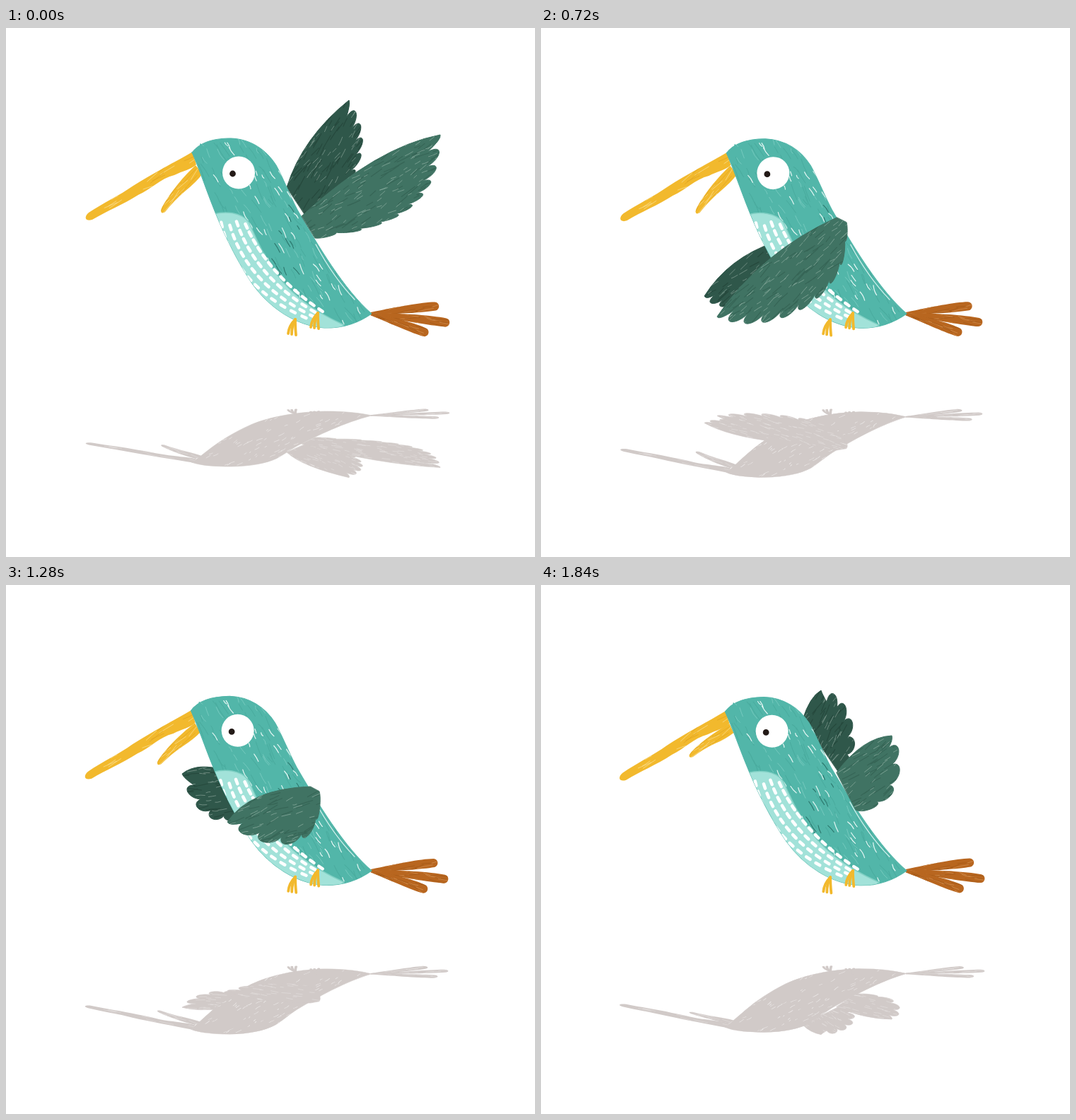
Write an HTML page with a canvas that moves like this. It is 748 px wide and 748 px high and loops after 1.92 s.

```html
<!DOCTYPE html>
<html lang="en">
<head>
<meta charset="utf-8">
<title>Flying bird</title>
<style>
  html, body { margin: 0; width: 100%; height: 100%; overflow: hidden; background: #fff; }
  canvas { display: block; width: 100vw; height: 100vh; }
</style>
</head>
<body>
<canvas id="stage" width="748" height="748"></canvas>
<script>
const ctx = document.getElementById('stage').getContext('2d');
const STEP = 80, STEPS = 24, FLAP = 6;
const HEAD_TOP = 155, FEET_Y = 438, SHADOW_Y = 538, SHADOW_H = 98;
const JOINT = [516, 404], JAW_JOINT = [272, 196];
const SHADE = '#d1cac8', YELLOW = '#f2b92d', TEAL = '#52b6a9';

const BODY = new Path2D('M263 176C275 160 297 156 318 156C346 157 368 172 382 194C392 212 400 234 412 257C440 306 478 370 517 404C500 416 478 425 450 424C410 421 372 396 347 360C322 322 303 280 290 246C280 220 272 196 263 176Z');
const BELLY = new Path2D('M294 263C310 259 332 260 343 274C352 292 356 306 372 332C396 372 430 398 478 420L450 440L340 400L280 260Z');
const BEAK = new Path2D('M264 175C240 189 205 207 180 223C160 237 138 247 117 261C109 268 113 274 122 271C142 259 165 250 187 236C205 228 218 213 238 208C250 202 262 200 269 193Z');
const JAW = new Path2D('M268 194C252 209 234 230 222 251C217 259 219 264 225 260C233 250 242 240 254 230C264 222 272 214 278 206Z');

// Wing key points: root, leading edge, tip, two pulls on the feathered edge, rear root.
const UP = {
  near: [[418, 266], [524, 168], [614, 151], [615, 235], [573, 283], [437, 297]],
  far: [[397, 225], [419, 155], [485, 102], [512, 140], [525, 205], [430, 275]]
};
const DOWN = {
  near: [[418, 268], [312, 316], [249, 408], [300, 440], [445, 400], [432, 275]],
  far: [[330, 303], [265, 325], [231, 379], [240, 400], [290, 410], [345, 340]]
};
const FOLD = {
  near: [[430, 285], [345, 288], [313, 335], [335, 365], [455, 405], [443, 292]],
  far: [[310, 262], [270, 250], [249, 267], [255, 305], [285, 350], [335, 330]]
};
const RISE = {
  near: [[418, 265], [455, 215], [496, 213], [515, 225], [520, 325], [445, 318]],
  far: [[370, 190], [380, 158], [396, 149], [430, 145], [465, 215], [428, 275]]
};
const POSES = [UP, blend(UP, DOWN, 0.25), blend(UP, DOWN, 0.8), DOWN, FOLD, RISE];

function mix(p, q, t) {
  return p.map((v, i) => v + (q[i] - v) * t);
}

function blend(a, b, t) {
  const side = k => a[k].map((p, i) => mix(p, b[k][i], t));
  return { near: side('near'), far: side('far') };
}

// Point on a Bezier curve of any degree.
function curve(pts, t) {
  while (pts.length > 1) pts = pts.slice(1).map((p, i) => mix(pts[i], p, t));
  return pts[0];
}

function clamp(t) {
  return Math.max(0, Math.min(1, t));
}

function random(seed) {
  return () => {
    seed = (seed * 1664525 + 1013904223) >>> 0;
    return seed / 4294967296;
  };
}

// Feathers fan out from the hub; each lobe bulges between two notches.
function wingPath([root, lead, tip, pullA, pullB, rear]) {
  const span = Math.hypot(tip[0] - rear[0], tip[1] - rear[1]);
  const lobes = Math.max(3, Math.round(span / 26)), depth = 10 + span * 0.05;
  const hub = mix(root, rear, 0.5), edge = [tip, pullA, pullB, rear];
  const notch = i => {
    const t = (i + 0.5) / (lobes + 0.5), p = curve(edge, t);
    const reach = Math.hypot(p[0] - hub[0], p[1] - hub[1]) || 1;
    return i === lobes ? rear : mix(p, hub, Math.min(0.5, depth * (1 - t * 0.5) / reach));
  };
  const path = new Path2D();
  path.moveTo(...root);
  path.quadraticCurveTo(...lead, ...tip);
  path.quadraticCurveTo(tip[0] + 2, tip[1] + 6, ...notch(0));
  for (let i = 1; i <= lobes; i++) {
    const a = notch(i - 1), b = notch(i);
    const peak = curve(edge, i / (lobes + 0.5)), mid = mix(a, b, 0.5);
    const push = p => p.map((v, k) => v + (peak[k] - mid[k]) * 1.3);
    path.bezierCurveTo(...push(a), ...push(b), ...b);
  }
  path.closePath();
  return path;
}

// Short hand-drawn strokes inside a shape. box = [x, y, w, h]
function scratch(path, box, count, angle, length, color, width, seed) {
  const rnd = random(seed);
  ctx.save();
  ctx.clip(path);
  ctx.strokeStyle = color;
  ctx.lineWidth = width;
  ctx.beginPath();
  for (let i = 0; i < count; i++) {
    const x = box[0] + rnd() * box[2], y = box[1] + rnd() * box[3];
    const a = angle + (rnd() - 0.5) * 0.45, l = length * (0.5 + rnd());
    const bend = (rnd() - 0.5) * 3;
    const dx = Math.cos(a) * l, dy = Math.sin(a) * l;
    ctx.moveTo(x, y);
    ctx.quadraticCurveTo(x + dx / 2 - bend, y + dy / 2 + bend, x + dx, y + dy);
  }
  ctx.stroke();
  ctx.restore();
}

function shape(path, color, edge = 0) {
  ctx.fillStyle = ctx.strokeStyle = color;
  ctx.fill(path);
  if (edge) {
    ctx.lineWidth = edge;
    ctx.stroke(path);
  }
}

function line(d, color, width) {
  ctx.strokeStyle = color;
  ctx.lineWidth = width;
  ctx.stroke(new Path2D(d));
}

function disc(x, y, r, color) {
  ctx.fillStyle = color;
  ctx.beginPath();
  ctx.arc(x, y, r, 0, 7);
  ctx.fill();
}

function around([px, py], angle, scale, draw) {
  ctx.save();
  ctx.translate(px, py);
  ctx.rotate(angle);
  ctx.scale(scale, scale);
  ctx.translate(-px, -py);
  draw();
  ctx.restore();
}

function wing(pts, color, light, dark, shadow, seed) {
  const path = wingPath(pts), [root, , tip] = pts;
  const xs = pts.map(p => p[0]), ys = pts.map(p => p[1]);
  const x = Math.min(...xs), y = Math.min(...ys);
  const box = [x, y, Math.max(...xs) - x, Math.max(...ys) - y];
  const angle = Math.atan2(tip[1] - root[1], tip[0] - root[0]);
  const count = box[2] * box[3] / 200;
  shape(path, shadow ? SHADE : color, 1);
  if (!shadow) scratch(path, box, count, angle, 16, dark, 1.2, seed + 5);
  scratch(path, box, count, angle, 9, shadow ? 'rgba(255,255,255,.45)' : light, 0.8, seed);
}

function tail(stretch, shadow) {
  for (const [x, y] of [[612, 393], [627, 417], [597, 432]]) {
    const dx = (x - JOINT[0]) * stretch, dy = y - JOINT[1], len = Math.hypot(dx, dy);
    const path = new Path2D();
    path.moveTo(0, -2);
    path.bezierCurveTo(len * 0.4, -5, len * 0.75, -8, len - 5, -6);
    path.bezierCurveTo(len + 2, -5, len + 2, 5, len - 5, 6);
    path.bezierCurveTo(len * 0.75, 7, len * 0.4, 4, 0, 2);
    ctx.save();
    ctx.translate(...JOINT);
    ctx.rotate(Math.atan2(dy, dx));
    shape(path, shadow ? SHADE : '#b8661f');
    const box = [0, -6, len, 12];
    scratch(path, box, 9, 0, 18, shadow ? 'rgba(255,255,255,.4)' : '#cf8a4a', 0.8, y);
    if (!shadow) scratch(path, box, 8, 0, 22, '#a55a18', 0.8, x);
    ctx.restore();
  }
}

function beakPart(path, box, angle, shadow, seed) {
  shape(path, shadow ? SHADE : YELLOW);
  scratch(path, box, 34, angle, 16, shadow ? 'rgba(255,255,255,.4)' : '#f9dc8d', 0.8, seed);
  if (!shadow) scratch(path, box, 30, angle, 18, '#e0a522', 0.8, seed + 3);
}

function feet(color) {
  for (const [x, y] of [[409, 412], [441, 403]]) {
    for (const toe of [-10, -5, 1]) {
      line(`M${x} ${y}q${toe * 0.8 - 1} 9 ${toe} ${22 + toe * 0.2}`, color, 3.8);
    }
  }
}

function belly() {
  const left = [[305, 278], [328, 378], [450, 420]];
  const right = [[338, 276], [372, 355], [462, 410]];
  const rows = 13, cols = 4;
  ctx.save();
  ctx.clip(BODY);
  shape(BELLY, '#a2e2d9');
  ctx.strokeStyle = '#80d0c4';
  ctx.lineWidth = 1.5;
  ctx.stroke(BELLY);
  ctx.strokeStyle = '#fff';
  ctx.lineWidth = 4.5;
  ctx.beginPath();
  for (let row = 0; row < rows; row++) {
    for (let col = 0; col < cols; col++) {
      const t = (row + (col % 2) * 0.35) / rows * 0.95;
      const spot = s => mix(curve(left, s), curve(right, s), col / (cols - 1));
      const [x, y] = spot(t), [x2, y2] = spot(t + 0.02);
      const a = Math.atan2(y2 - y, x2 - x), dx = 3.3 * Math.cos(a), dy = 3.3 * Math.sin(a);
      ctx.moveTo(x - dx, y - dy);
      ctx.lineTo(x + dx, y + dy);
    }
  }
  ctx.stroke();
  ctx.restore();
}

function body(shadow) {
  const box = [262, 155, 255, 265];
  shape(BODY, shadow ? SHADE : TEAL, 1);
  if (shadow) {
    scratch(BODY, box, 150, 1.05, 10, 'rgba(255,255,255,.6)', 1, 7);
    return;
  }
  scratch(BODY, box, 200, 1.05, 18, '#4aac9f', 1.1, 17);
  scratch(BODY, box, 130, 1.05, 12, '#79cbc0', 0.9, 23);
  scratch(BODY, box, 110, 1.05, 10, '#e4f6f3', 1.2, 7);
  scratch(BODY, [375, 250, 45, 100], 12, 1.05, 10, '#2c776d', 1.1, 12);
  line('M438 306C455 338 474 364 493 384', '#d3f0ec', 1.3);
  line('M274 170L275 164L278 168', TEAL, 1.4);
  belly();
  disc(329, 204.5, 23, '#fff');
  disc(320.5, 206, 4.4, '#231a17');
}

function bird(step, shadow) {
  const phase = step % FLAP, pose = POSES[phase];
  const tilt = 0.012 * (phase / (FLAP - 1)) ** 2.5;
  const stretch = 1 - 0.054 * clamp(1 - Math.abs(step - 12) / 6);
  // The jaw closes with speed, stays shut, then opens again.
  const shut = Math.min(clamp((step - 14) / 4) ** 2, clamp((STEPS - step) / 3) ** 0.5);

  wing(pose.far, '#2f574a', '#7d998d', '#26493d', shadow, phase + 100);
  around(JOINT, -tilt, 1, () => {
    tail(stretch, shadow);
    if (shut < 1) {
      around(JAW_JOINT, shut * 0.47, 1 - shut * 0.19, () =>
        beakPart(JAW, [218, 196, 56, 66], 2.25, shadow, 61));
    }
    beakPart(BEAK, [115, 175, 155, 97], 2.6, shadow, 71);
    body(shadow);
    feet(shadow ? SHADE : YELLOW);
  });
  wing(pose.near, '#407363', '#86a99b', '#366556', shadow, phase + 200);
}

function draw(step) {
  ctx.fillStyle = '#fff';
  ctx.fillRect(0, 0, 748, 748);
  ctx.lineCap = ctx.lineJoin = 'round';
  // The shadow is the bird upside down, pressed into a strip of fixed height.
  const top = Math.min(HEAD_TOP, POSES[step % FLAP].far[2][1] - 1);
  const press = SHADOW_H / (FEET_Y - top);
  ctx.save();
  ctx.transform(1, 0, 0, -press, 0, SHADOW_Y + press * FEET_Y);
  bird(step, true);
  ctx.restore();
  bird(step, false);
}

const start = performance.now();
let shown = -1;
function tick() {
  const step = Math.floor((performance.now() - start) / STEP) % STEPS;
  if (step !== shown) draw(shown = step);
  requestAnimationFrame(tick);
}
tick();
</script>
</body>
</html>
```
